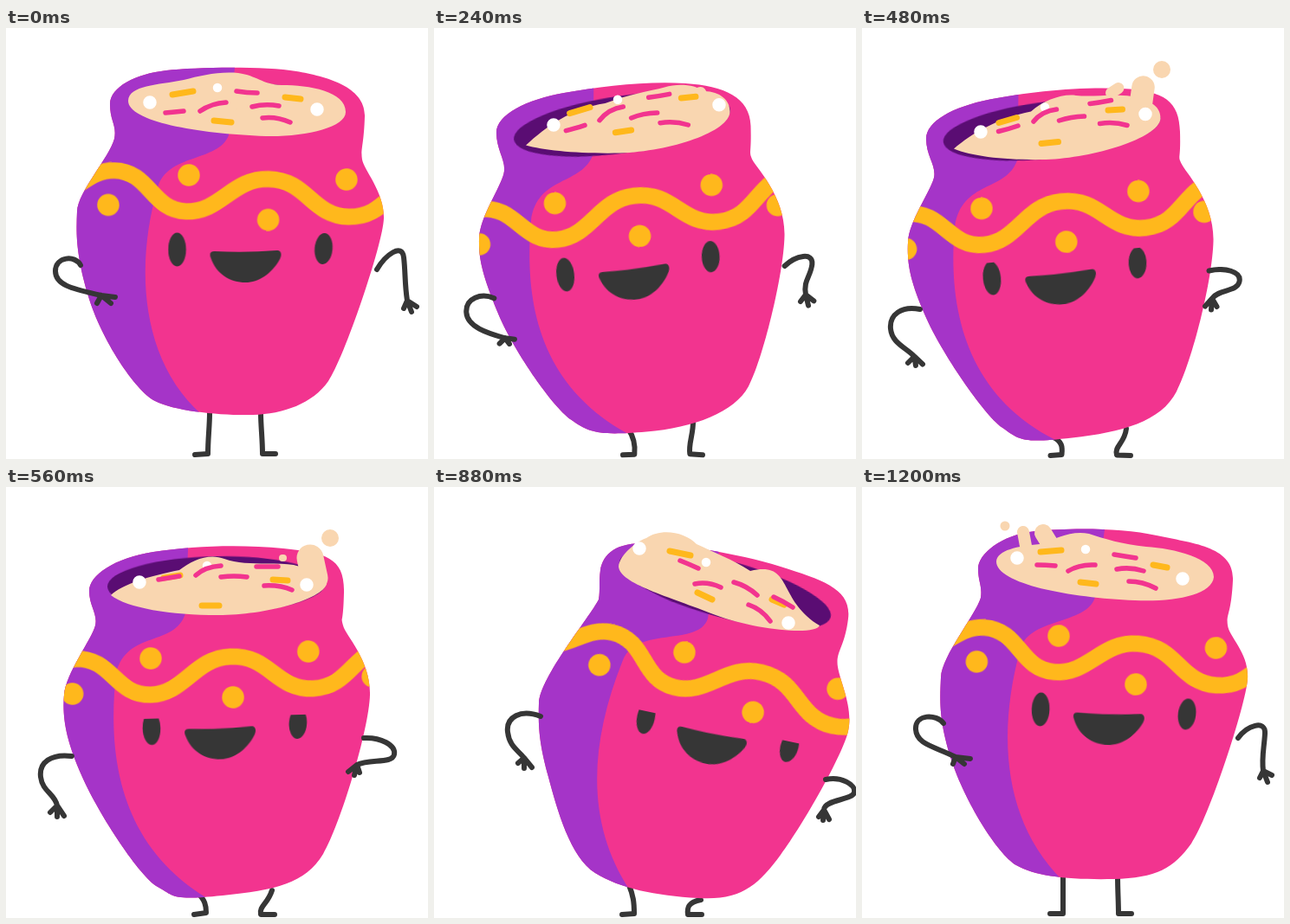
An HTML page without scripts for the animation above (1280 ms loop, 487 by 498 pixels).

```html
<!DOCTYPE html>
<html lang="en">
<head>
<meta charset="utf-8">
<title>Swaying pot</title>
<style>
html,body{margin:0;height:100%;overflow:hidden;background:#fff}
svg{display:block;width:100%;height:100%}
/* every part moves on an 80 ms beat */
svg *{animation:1280ms steps(2) infinite}
.line{fill:none;stroke-linecap:round;stroke-linejoin:round}
.ink{stroke:#363636;stroke-width:6}
.gold{stroke:#ffb81c}
.milk{stroke:#f9d6b0}
#body{animation-name:body}
#shade{animation-name:shade}
#band{animation-name:band}
#hole{animation-name:hole}
#milk{animation-name:milk}
#jet{animation-name:jet}
#spurt{animation-name:spurt}
#drop{animation-name:drop}
#pearls{animation-name:pearls}
#pearl{animation-name:pearl}
#nuts{animation-name:nuts}
#petals{animation-name:petals}
#face{animation-name:face}
#lid{animation:lid 1280ms step-end infinite}
#shut{animation:shut 1280ms step-end infinite;opacity:0}
#armL{animation-name:armL}
#armR{animation-name:armR}
#legs{animation-name:legs}

@keyframes body{
0%,100%{d:path("M125 128C128 112 120 108 120 88S150 53 185 49S300 44 335 50S415 68 414 102S409 140 411 152S437 190 436 220S390 382 372 408S320 446 285 447S195 443 172 431S110 360 95 310S81 235 82 212S119 150 125 128Z")}
12.5%{d:path("M98 150C102 136 92 126 92 106S130 65 175 60S260 53 300 59S388 72 387 108S384 140 386 150S419 188 418 228S382 388 366 412S310 456 255 458S190 456 168 444S105 370 88 325S64 258 65 232S95 166 98 150Z");animation-timing-function:linear(0 0% 33.3%,.5 33.3% 66.6%,.88 66.6% 99.9%,1)}
31.25%{d:path("M63 186C66 172 52 158 52 136S84 100 125 90S230 69 280 69S341 88 344 118S342 145 348 153S392 200 391 252S376 380 360 416S290 468 235 475S170 480 148 461S75 370 58 330S39 278 39 255S59 202 63 186Z")}
43.75%{d:path("M103 160C106 146 96 138 96 120S125 82 170 75S270 66 320 71S391 82 390 122S386 148 389 160S421 200 420 240S386 390 366 424S310 466 250 472S195 473 175 462S108 380 88 335S65 265 67 240S99 176 103 160Z")}
56.25%{d:path("M146 140C148 128 143 118 143 100S165 69 205 67S320 71 370 80S439 98 436 138S427 172 430 185S454 218 450 248S402 388 378 420S335 468 290 471S195 464 174 448S112 362 102 320S94 268 95 242S139 158 146 140Z")}
68.75%{d:path("M190 130C192 118 190 110 192 96S205 65 240 65S350 76 400 92S482 118 478 152S463 190 466 208S484 255 478 282S426 390 400 425S355 478 305 475S215 464 186 446S142 372 132 335S120 280 121 250S180 150 190 130Z");animation-timing-function:linear(0 0% 25%,-.04 25% 50%,.2 50% 75%,.6 75% 99.9%,1)}
93.75%{d:path("M137 128C139 114 134 110 134 94S160 55 200 51S300 47 340 56S430 68 428 108S420 146 422 160S447 192 445 222S400 384 380 412S340 452 290 453S200 450 178 437S118 362 103 315S90 245 91 220S131 148 137 128Z");animation-timing-function:steps(1)}
}
@keyframes shade{
0%,100%{d:path("M0 0H268L257 124C245 155 185 145 175 185C150 270 152 385 230 450V500H0Z")}
12.5%{d:path("M0 0H219L216 133C203 170 148 155 137 200C128 290 130 390 235 462V500H0Z");animation-timing-function:linear(0 0% 33.3%,.5 33.3% 66.6%,.88 66.6% 99.9%,1)}
31.25%{d:path("M0 0H150L152 157C140 195 90 185 87 245C80 340 110 435 215 477V500H0Z")}
43.75%{d:path("M0 0H213L207 146C195 185 140 165 127 215C118 300 125 410 232 475V500H0Z")}
56.25%{d:path("M0 0H277L262 146C250 180 190 155 175 205C148 300 145 400 218 468V500H0Z")}
68.75%{d:path("M0 0H341L316 152C305 185 235 160 218 200C178 300 176 390 226 466V500H0Z");animation-timing-function:linear(0 0% 25%,-.04 25% 50%,.2 50% 75%,.6 75% 99.9%,1)}
93.75%{d:path("M0 0H287L269 127C260 160 190 150 182 190C155 290 165 390 232 455V500H0Z");animation-timing-function:steps(1)}
}
@keyframes band{
0%,100%{transform:translate(211px,170px) rotate(1.6deg)}
12.5%{transform:translate(170px,186px) rotate(-3.2deg);animation-timing-function:linear(0 0% 33.3%,.5 33.3% 66.6%,.88 66.6% 99.9%,1)}
31.25%{transform:translate(109px,219px) rotate(-10.1deg)}
43.75%{transform:translate(167px,198px) rotate(-2.5deg)}
56.25%{transform:translate(228px,189px) rotate(5.4deg)}
68.75%{transform:translate(289px,191px) rotate(13.4deg);animation-timing-function:linear(0 0% 25%,-.04 25% 50%,.2 50% 75%,.6 75% 99.9%,1)}
93.75%{transform:translate(227px,172px) rotate(4.4deg);animation-timing-function:steps(1)}
}
@keyframes hole{
0%,100%{transform:translate(267px,90px) rotate(3deg) scale(.88)}
12.5%{transform:translate(239px,101px) rotate(-4deg) scale(1);animation-timing-function:linear(0 0% 33.3%,.5 33.3% 66.6%,.88 66.6% 99.9%,1)}
31.25%{transform:translate(195px,122px) rotate(-12deg) scale(1)}
43.75%{transform:translate(243px,113px) rotate(-1deg) scale(1)}
56.25%{transform:translate(288px,113px) rotate(8deg) scale(.99)}
68.75%{transform:translate(336px,118px) rotate(15deg) scale(1);animation-timing-function:linear(0 0% 25%,-.04 25% 50%,.2 50% 75%,.6 75% 99.9%,1)}
93.75%{transform:translate(280px,96px) rotate(5deg) scale(.88);animation-timing-function:steps(1)}
}
@keyframes milk{
0%,100%{d:path("M141 84C142 66 175 66 205 60C225 55 245 50 268 52C290 55 295 65 318 66C350 66 392 73 392 97C392 115 345 126 300 125C220 122 141 108 141 84Z")}
12.5%{d:path("M121 117C140 97 165 82 205 77C245 71 268 71 290 64C310 59 332 65 334 78C352 77 364 86 364 95C364 115 310 133 250 133C190 133 140 126 121 117Z");animation-timing-function:linear(0 0% 33.3%,.5 33.3% 66.6%,.88 66.6% 99.9%,1)}
31.25%{d:path("M91 154C120 130 150 105 190 97C205 82 230 75 242 73C255 68 270 66 290 68C308 70 319 80 319 98C319 125 235 152 180 156C145 158 115 157 91 154Z")}
43.75%{d:path("M121 125C135 112 165 103 200 96C215 84 235 76 252 83C275 92 310 86 332 90C350 95 371 97 370 112C365 130 300 148 245 148C190 148 140 140 121 125Z")}
56.25%{d:path("M164 103C163 88 190 73 215 76C235 81 255 84 275 84C300 86 325 97 350 103C380 104 408 110 409 130C407 155 380 152 345 151C280 146 165 130 164 103Z")}
68.75%{d:path("M213 92C214 78 235 62 245 59C262 47 290 52 303 66C320 74 345 84 365 97C415 85 395 130 445 160C440 172 370 165 325 148C270 126 215 112 213 92Z");animation-timing-function:linear(0 0% 25%,-.04 25% 50%,.2 50% 75%,.6 75% 99.9%,1)}
93.75%{d:path("M155 86C156 73 180 68 205 66C225 60 240 50 262 54C280 60 300 66 328 69C360 71 406 82 406 104C404 125 360 133 315 131C240 128 155 112 155 86Z");animation-timing-function:steps(1)}
}
@keyframes jet{
0%,100%{d:path("M260 90L262 92");stroke-width:10}
12.5%{d:path("M310 85L312 85");stroke-width:10;animation-timing-function:steps(3)}
31.25%{d:path("M288 68L298 55");stroke-width:22}
43.75%{d:path("M356 105L351 82");stroke-width:31}
56.25%{d:path("M400 135L416 117");stroke-width:24}
68.75%{d:path("M385 125L390 128");stroke-width:16}
81.25%{d:path("M245 64L232 40");stroke-width:24}
93.75%{d:path("M217 66L209 53");stroke-width:20;animation-timing-function:steps(1)}
}
@keyframes spurt{
0%,100%{d:path("M230 90L232 90");stroke-width:8}
12.5%{d:path("M290 85L292 85");stroke-width:8;animation-timing-function:steps(3)}
31.25%{d:path("M256 68L272 57");stroke-width:18}
43.75%{d:path("M319 82L320 82");stroke-width:8}
56.25%{d:path("M398 135L398 141");stroke-width:18}
68.75%{d:path("M380 120L382 122");stroke-width:10}
81.25%{d:path("M222 70L214 56");stroke-width:16}
93.75%{d:path("M189 68L186 52");stroke-width:14;animation-timing-function:steps(1)}
}
@keyframes drop{
0%,100%{d:path("M270 90h0");stroke-width:8}
12.5%{d:path("M300 90h0");stroke-width:8;animation-timing-function:steps(3)}
31.25%{d:path("M294 60h0");stroke-width:18;animation-timing-function:steps(1)}
37.5%{d:path("M346 48h0");stroke-width:20;animation-timing-function:steps(1)}
43.75%{d:path("M374 59h0");stroke-width:20}
56.25%{d:path("M406 97h0");stroke-width:13}
68.75%{d:path("M380 128h0");stroke-width:8}
81.25%{d:path("M207 21h0");stroke-width:14}
93.75%{d:path("M165 45h0");stroke-width:11;animation-timing-function:steps(1)}
}
@keyframes pearls{
0%,100%{d:path("M166 86h0M359 94h0")}
12.5%{d:path("M147 103h0M340 90h0");animation-timing-function:steps(3)}
31.25%{d:path("M120 130h0M307 86h0")}
43.75%{d:path("M154 110h0M347 113h0")}
56.25%{d:path("M193 90h0M380 137h0")}
68.75%{d:path("M237 71h0M409 157h0");animation-timing-function:linear(0 0% 25%,-.04 25% 50%,.2 50% 75%,.6 75% 99.9%,1)}
93.75%{d:path("M179 82h0M370 106h0");animation-timing-function:steps(1)}
}
@keyframes pearl{
0%,100%{d:path("M244 69h0")}
12.5%{d:path("M223 78h0");animation-timing-function:steps(3)}
31.25%{d:path("M190 92h0")}
43.75%{d:path("M232 91h0")}
56.25%{d:path("M272 90h0")}
68.75%{d:path("M314 87h0");animation-timing-function:linear(0 0% 25%,-.04 25% 50%,.2 50% 75%,.6 75% 99.9%,1)}
93.75%{d:path("M258 72h0");animation-timing-function:steps(1)}
}
@keyframes nuts{
0%,100%{d:path("M192 77L216 73M322 80L340 82M240 107L260 109")}
12.5%{d:path("M168 91L192 85M298 80L315 79M220 116L238 114");animation-timing-function:steps(3)}
31.25%{d:path("M134 114L156 105M260 83L276 80M188 130L207 126")}
43.75%{d:path("M182 105L201 102M308 107L325 108M226 137L246 137")}
56.25%{d:path("M221 95L249 96M348 124L364 129M262 134L281 138")}
68.75%{d:path("M272 74L296 79M390 130L404 136M304 122L321 130");animation-timing-function:linear(0 0% 25%,-.04 25% 50%,.2 50% 75%,.6 75% 99.9%,1)}
93.75%{d:path("M206 75L230 73M336 90L352 93M252 110L270 112");animation-timing-function:steps(1)}
}
@keyframes petals{
0%,100%{d:path("M184 98Q195 97 205 96M224 96Q237 87 254 86M266 73Q278 75 290 75M284 91Q299 87 315 90M296 104Q312 102 328 109")}
12.5%{d:path("M159 112Q168 110 181 107M198 103Q210 90 227 88M253 79Q265 78 277 77M238 101Q252 96 269 97M266 111Q283 109 299 115");animation-timing-function:steps(3)}
31.25%{d:path("M139 132Q149 129 160 123M177 114Q185 100 201 97M237 83Q249 80 261 75M207 110Q219 103 235 100M251 107Q266 103 282 106")}
43.75%{d:path("M176 107Q188 105 200 103M219 102Q230 92 248 91M289 92Q301 92 314 92M248 104Q263 102 278 104M298 114Q316 113 330 119")}
56.25%{d:path("M228 91Q240 92 252 94M262 105Q275 100 292 101M344 106Q356 110 366 113M297 104Q311 103 326 109M332 125Q349 127 360 138")}
68.75%{d:path("M284 85Q294 89 305 94M301 112Q316 109 331 116M392 127Q403 132 414 139M346 110Q361 114 373 125M363 136Q378 141 388 155");animation-timing-function:linear(0 0% 25%,-.04 25% 50%,.2 50% 75%,.6 75% 99.9%,1)}
93.75%{d:path("M202 90Q212 90 223 91M238 97Q251 89 269 90M291 78Q303 80 316 82M294 95Q309 92 325 97M308 109Q324 109 339 117");animation-timing-function:steps(1)}
}
@keyframes face{
0%,100%{transform:translate(276.5px,258px) rotate(0deg)}
12.5%{transform:translate(250px,267.5px) rotate(-3.6deg);animation-timing-function:linear(0 0% 33.3%,.5 33.3% 66.6%,.88 66.6% 99.9%,1)}
31.25%{transform:translate(210.5px,288px) rotate(-9.9deg)}
43.75%{transform:translate(247px,278.5px) rotate(-1.6deg)}
56.25%{transform:translate(284px,277px) rotate(3.8deg)}
68.75%{transform:translate(321.5px,284.5px) rotate(12deg);animation-timing-function:linear(0 0% 25%,-.04 25% 50%,.2 50% 75%,.6 75% 99.9%,1)}
93.75%{transform:translate(285px,262px) rotate(2.2deg);animation-timing-function:steps(1)}
}
@keyframes lid{
0%,75%,100%{transform:translateY(0)}
37.5%{transform:translateY(4px)}
43.75%{transform:translateY(11px)}
50%{transform:translateY(24px)}
56.25%{transform:translateY(50px)}
62.5%{transform:translateY(25px)}
68.75%{transform:translateY(15px)}
}
@keyframes shut{0%,62.5%,100%{opacity:0}56.25%{opacity:1}}
@keyframes armL{
0%,100%{d:path("M86 274C80 262 57 264 57 281S80 302 110 309L126 311M121 318L110 309 105 318")}
12.5%{d:path("M75 299C62 292 42 296 43 313S70 337 92 342L103 341M98 348L92 342 86 348");animation-timing-function:steps(3)}
31.25%{d:path("M58 339C40 333 25 344 26 360S45 384 62 391L73 397M65 399L62 391 55 398")}
43.75%{d:path("M76 311C52 308 38 318 40 335S56 354 59 368L67 380M59 381L59 368 51 376")}
56.25%{d:path("M99 287C75 283 58 292 59 308S70 328 72 341L79 354M72 354L72 341 64 347")}
68.75%{d:path("M123 265C100 256 83 266 85 283S97 304 104 313L113 324M104 325L104 313 97 319");animation-timing-function:linear(0 0% 25%,-.04 25% 50%,.2 50% 75%,.6 75% 99.9%,1)}
93.75%{d:path("M94 273C86 262 61 262 62 280S85 300 108 312L125 314M118 320L108 312 105 320");animation-timing-function:steps(1)}
}
@keyframes armR{
0%,100%{d:path("M428 279C438 262 457 248 459 265S460 295 463 315L474 322M468 328L463 315 459 324")}
12.5%{d:path("M413 277C424 262 444 256 443 271S437 293 442 310L452 316M446 322L442 310 436 317");animation-timing-function:steps(3)}
31.25%{d:path("M388 271C405 264 426 264 423 277S404 289 403 304L411 314M404 318L403 304 397 314")}
43.75%{d:path("M413 290C432 289 450 298 448 309S420 314 405 321L408 330M402 333L405 321 395 329")}
56.25%{d:path("M433 312C455 316 470 326 467 335S432 338 421 343L424 353M415 355L421 343 411 348")}
68.75%{d:path("M452 338C470 334 487 344 485 353S450 361 450 373L456 384M449 385L450 373 444 381");animation-timing-function:linear(0 0% 25%,0 25% 50%,.2 50% 75%,.6 75% 99.9%,1)}
93.75%{d:path("M434 290C444 276 466 268 465 285S461 312 463 328L473 333M468 341L463 328 459 336");animation-timing-function:steps(1)}
}
@keyframes legs{
0%,100%{d:path("M235 445C235 460 233 475 233 492L218 493M294 445C294 460 296 475 296 492L311 492")}
12.5%{d:path("M226 456C230 470 233 480 232 492L218 493M297 452C297 465 295 480 296 492L310 493");animation-timing-function:steps(3)}
31.25%{d:path("M220 477C232 478 232 484 230 494L218 494M303 460C304 478 290 482 294 493L310 494")}
43.75%{d:path("M220 468C230 477 231 484 231 492L217 494M307 466C302 482 292 484 294 494L310 494")}
56.25%{d:path("M222 466C231 476 233 484 231 493L217 494M310 471C294 478 292 484 294 494L309 493")}
68.75%{d:path("M225 460C230 472 231 480 231 493L217 494M308 477C293 480 292 486 293 494L309 494");animation-timing-function:linear(0 0% 25%,0 25% 50%,.2 50% 75%,.6 75% 99.9%,1)}
93.75%{d:path("M232 448C232 460 232 475 232 493L217 493M295 450C295 465 296 480 296 493L311 493");animation-timing-function:steps(1)}
}
</style>
</head>
<body>
<svg viewBox="0 0 487 498">
<clipPath id="pot"><path id="body"/></clipPath>
<clipPath id="open"><rect id="lid" x="-120" y="-24" width="240" height="60"/></clipPath>

<path id="legs" class="line ink"/>

<g clip-path="url(#pot)">
<rect width="487" height="498" fill="#f2348f"/>
<path id="shade" fill="#a534c8"/>
<g id="band" class="line gold">
<path stroke-width="19" d="M-170 30C-130 30-120-3-86-3C-45-3-42 42-2 42C38 42 50 2 92 2C138 2 142 43 186 43C230 43 235-2 278-2"/>
<path stroke-width="25.5" d="M0 0h0M182 0h0M-92 37h0M93 49h0M255 32h0"/>
</g>
</g>

<ellipse id="hole" rx="126" ry="33" fill="#5a0d73"/>
<path id="milk" fill="#f9d6b0"/>
<g class="line milk"><path id="jet"/><path id="spurt"/><path id="drop"/></g>
<g class="line">
<path id="pearl" stroke="#fff" stroke-width="10.5"/>
<path id="nuts" class="gold" stroke-width="7"/>
<path id="petals" stroke="#f2348f" stroke-width="5.5"/>
<path id="pearls" stroke="#fff" stroke-width="15.5"/>
</g>

<g id="face" fill="#363636">
<g clip-path="url(#open)">
<ellipse cx="-79" cy="-2" rx="10.3" ry="19.5"/>
<ellipse cx="90" cy="-3" rx="10.3" ry="18" transform="rotate(5 90 -3)"/>
</g>
<path id="shut" class="line ink" d="M-89 4C-86 18-72 18-68 4M80 4C82 18 95 17 97 8"/>
<path d="M-36 0Q0 2 36-1C42-1 42 5 39 10C30 26 15 36 0 36C-18 36-34 26-40 8C-42 3-41 0-36 0Z"/>
</g>

<path id="armL" class="line ink"/>
<path id="armR" class="line ink"/>
</svg>
</body>
</html>
```
